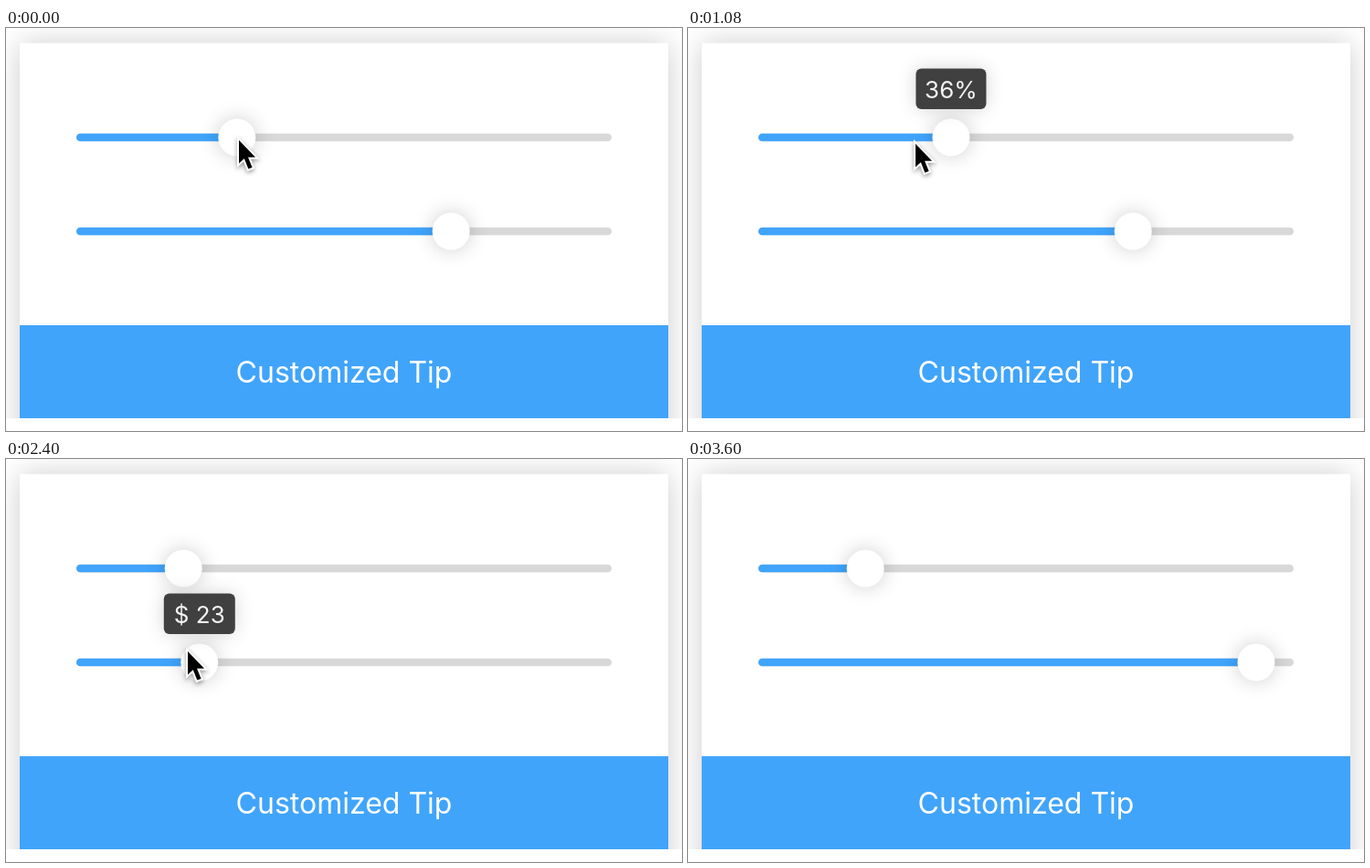
Recreate the animation shown at these times as an HTML page with a canvas. Size 740 by 442 pixels, loop 3960 ms.

```html
<!DOCTYPE html>
<html lang="en">
<head>
<meta charset="utf-8">
<title>Slider with tips</title>
<style>
  html, body { margin: 0; width: 100%; height: 100%; overflow: hidden; background: #fff; }
  canvas { display: block; width: 740px; height: 442px; }
</style>
</head>
<body>
<canvas id="stage" width="740" height="442"></canvas>
<script>
const ctx = document.getElementById('stage').getContext('2d');
const LOOP = 3960, STEP = 60;
const TRACK = { x: 77, w: 586, h: 8.6 };
const BLUE = '#40a4fb', FONT = 'Inter, "Open Sans", sans-serif';

// Pointer path: time, x, y
const PATH = [
  [0, 255, 123], [90, 255, 123], [300, 405, 124], [480, 560, 125], [600, 580, 125],
  [690, 578, 125], [780, 559, 124], [840, 546, 124], [1020, 291, 126], [1140, 222, 128],
  [1260, 195, 129], [1380, 195, 129], [1620, 195, 129], [1750, 330, 165], [1920, 488, 207],
  [2130, 488, 207], [2270, 300, 210], [2340, 212, 211], [2400, 199, 211], [2490, 184, 211],
  [2640, 184, 211], [2850, 430, 210], [3000, 617, 208], [3060, 624, 208], [3240, 624, 208],
  [3580, 624, 460]
];

const clamp = (v, lo, hi) => Math.min(hi, Math.max(lo, v));

// Zero slope at turning points, harmonic mean elsewhere
function slope(i, k) {
  if (i <= 0 || i >= PATH.length - 1) return 0;
  const [p, q, r] = [PATH[i - 1], PATH[i], PATH[i + 1]];
  const a = (q[k] - p[k]) / (q[0] - p[0]);
  const b = (r[k] - q[k]) / (r[0] - q[0]);
  return a * b <= 0 ? 0 : 2 * a * b / (a + b);
}

function pointer(t, k) {
  const end = PATH.length - 1;
  t = clamp(t, 0, PATH[end][0]);
  let i = 0;
  while (i < end - 1 && t > PATH[i + 1][0]) i++;
  const p = PATH[i], q = PATH[i + 1], d = q[0] - p[0], u = (t - p[0]) / d;
  const s = u * u * (3 - 2 * u);
  return p[k] + (q[k] - p[k]) * s
    + d * u * (1 - u) * ((1 - u) * slope(i, k) - u * slope(i + 1, k));
}

// The thumb trails the pointer by one step and snaps to whole values
function valueAt(t, start, end) {
  const x = pointer(clamp(t - STEP, start, end), 1);
  return clamp(Math.round((x - TRACK.x - 1) / TRACK.w * 100), 0, 100);
}

function box(x, y, w, h, r, fill) {
  ctx.beginPath();
  ctx.roundRect(x, y, w, h, r);
  ctx.fillStyle = fill;
  ctx.fill();
}

function withShadow(color, blur, draw) {
  ctx.save();
  ctx.shadowColor = color;
  ctx.shadowBlur = blur;
  draw();
  ctx.restore();
}

function label(text, x, y, size, color) {
  ctx.font = `400 ${size}px ${FONT}`;
  ctx.textAlign = 'center';
  ctx.fillStyle = color;
  ctx.fillText(text, x, y);
}

function card() {
  ctx.fillStyle = '#fff';
  ctx.fillRect(0, 0, 740, 442);
  ctx.save();
  ctx.beginPath();
  ctx.rect(0, 0, 740, 428);
  ctx.clip();
  withShadow('rgba(0,0,0,.2)', 30, () => box(15, 16.5, 710, 460, 0, '#fff'));
  ctx.restore();
  ctx.fillStyle = BLUE;
  ctx.fillRect(15, 326, 710, 102);
  label('Customized Tip', 370, 389, 32, '#fff');
}

function slider(y, value, text, tipWidth, tipAlpha) {
  const x = TRACK.x + TRACK.w * value / 100, top = y - TRACK.h / 2;
  box(TRACK.x, top, TRACK.w, TRACK.h, 4.3, '#d8d8d8');
  box(TRACK.x, top, x - TRACK.x, TRACK.h, 4.3, BLUE);
  withShadow('rgba(0,0,0,.2)', 22, () => box(x - 20.5, y - 20.5, 41, 41, 20.5, '#fff'));
  if (tipAlpha <= 0) return;
  ctx.globalAlpha = tipAlpha;
  withShadow('rgba(0,0,0,.17)', 20, () =>
    box(x - tipWidth / 2, y - 75.5, tipWidth, 44.5, 6, '#404040'));
  label(text, x, y - 43, 26, '#f4f4f4');
  ctx.globalAlpha = 1;
}

function arrow(x, y) {
  const shape = new Path2D('M0 0V25.5L5.8 20.2L10.3 31.6L14.6 29.9L10 18.7H18Z');
  ctx.save();
  ctx.translate(x, y);
  ctx.lineJoin = 'miter';
  ctx.lineWidth = 4;
  ctx.strokeStyle = '#fff';
  ctx.shadowColor = 'rgba(0,0,0,.4)';
  ctx.shadowBlur = 5;
  ctx.shadowOffsetY = 2;
  ctx.stroke(shape);
  ctx.shadowColor = 'transparent';
  ctx.fillStyle = '#000';
  ctx.fill(shape);
  ctx.restore();
}

const fade = (t, start, end) => clamp(Math.min((t - start) / 120, (end - t) / 120), 0, 1);

function render(t) {
  const first = valueAt(t, 0, 1500), second = valueAt(t, 2000, 3240);
  card();
  slider(120, first, first + '%', 77, fade(t, 30, 1560));
  slider(223, second, '$ ' + second, 78, fade(t, 2010, 3220));
  if (t < 3600) arrow(pointer(t, 1), pointer(t, 2));
}

const origin = performance.now();
function tick() {
  const t = (performance.now() - origin) % LOOP;
  render(Math.floor(t / STEP) * STEP);
  requestAnimationFrame(tick);
}
tick();
</script>
</body>
</html>
```
